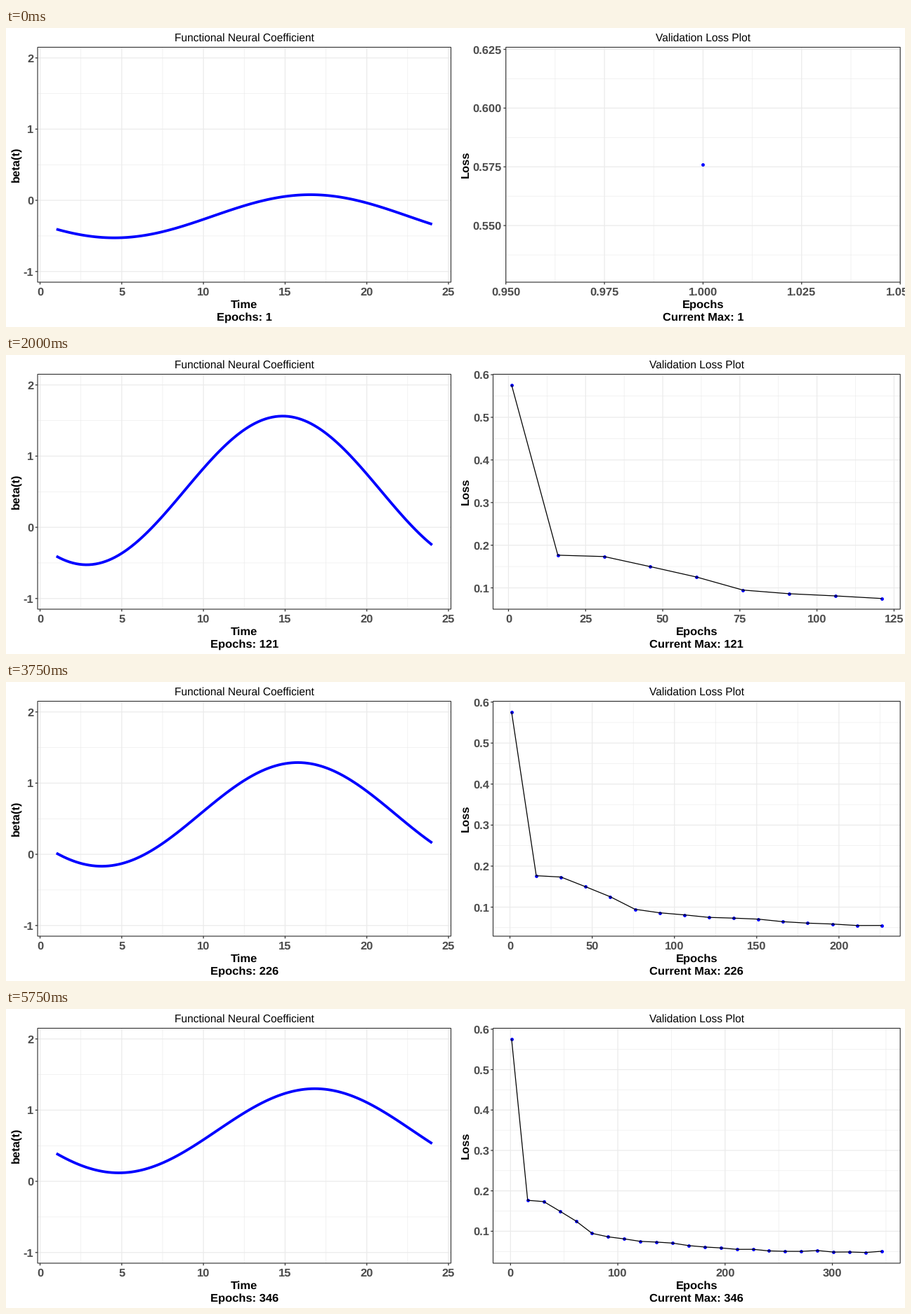
Animation of 1280 by 427 pixels, one loop 6000 ms. Source, as a matplotlib script:

```python
import math

import matplotlib.pyplot as plt
import numpy as np
from matplotlib.animation import FuncAnimation
from matplotlib.patches import Rectangle

W, H, DPI = 1280, 427, 64
PT = 72 / DPI  # points per pixel
FRAMES, INTERVAL = 24, 250
TOP, BOTTOM = 27.5, 363.0

plt.rcParams["font.family"] = "Liberation Sans"
plt.rcParams["text.hinting"] = "none"

epochs = 1 + 15 * np.arange(FRAMES)
loss = np.array([
    .5759, .1766, .1734, .1497, .1253, .0948, .0862, .0811,
    .0750, .0732, .0707, .0645, .0610, .0588, .0552, .0553,
    .0514, .0503, .0502, .0523, .0485, .0487, .0474, .0505])

# Coefficient curve: mean, amplitude and peak time at a few steps
OMEGA = 2 * math.pi / 24
knots = np.array([0, 5, 8, 13, 17, 21, 23])
waves = np.array([
    (-.224, .303, 16.55), (.361, 1.016, 15.11), (.518, 1.044, 14.85),
    (.545, .804, 15.42), (.585, .671, 16.15), (.674, .614, 16.66),
    (.710, .591, 16.82)])


def smooth(x, xs, ys):
    """Cubic Hermite curve through the rows of ys."""
    slopes = np.gradient(ys, xs, axis=0, edge_order=2)
    i = np.clip(np.searchsorted(xs, x, "right") - 1, 0, len(xs) - 2)
    h = (xs[i + 1] - xs[i])[:, None]
    u = (x - xs[i])[:, None] / h
    return ((1 + 2 * u) * (1 - u) ** 2 * ys[i]
            + u * (1 - u) ** 2 * h * slopes[i]
            + u ** 2 * (3 - 2 * u) * ys[i + 1]
            + u ** 2 * (u - 1) * h * slopes[i + 1])


mean, amp, peak = waves.T
basis = np.column_stack(
    [mean, amp * np.cos(OMEGA * peak), amp * np.sin(OMEGA * peak)])
coefs = smooth(np.arange(FRAMES), knots, basis)
time = np.linspace(1, 24, 116)


def extended_breaks(lo, hi, m=5):
    """Extended Wilkinson tick placement; returns (ticks, step)."""
    nice = [1, 5, 2, 2.5, 4, 3]
    span = hi - lo
    unit = 2 * (.1 * span) ** 2
    best, found = -2, None
    for j in range(1, 20):
        for i, q in enumerate(nice):
            simple_max = 2 - i / (len(nice) - 1) - j
            if .25 * simple_max + .75 < best:
                return found
            for k in range(2, 40):
                dense_max = 2 - (k - 1) / (m - 1) if k >= m else 1
                if .25 * simple_max + .25 + .5 * dense_max < best:
                    break
                z = math.ceil(math.log10(span / (k + 1) / (j * q)))
                while True:
                    step = j * q * 10.0 ** z
                    z += 1
                    over = max(0, step * (k - 1) - span) / 2
                    cover_max = 1 - 2 * over ** 2 / unit
                    if (.25 * simple_max + .2 * cover_max
                            + .5 * dense_max + .05 < best):
                        break
                    first = (math.floor(hi / step) - (k - 1)) * j
                    last = math.ceil(lo / step) * j
                    for start in range(first, last + 1):
                        a = start * step / j
                        b = a + step * (k - 1)
                        has_zero = start % j == 0 and a <= 0 <= b
                        simple = 1 - i / (len(nice) - 1) - j + has_zero
                        cover = 1 - ((hi - b) ** 2 + (lo - a) ** 2) / unit
                        r = (k - 1) / (b - a)
                        rt = (m - 1) / (max(b, hi) - min(a, lo))
                        dense = 2 - max(r / rt, rt / r)
                        score = .25 * simple + .2 * cover + .5 * dense + .05
                        if score > best:
                            best = score
                            found = a + step * np.arange(k), step
    return found


def expand(values):
    lo, hi = min(values), max(values)
    pad = .05 * (hi - lo) if hi > lo else .05
    return lo - pad, hi + pad


def within(values, limits):
    lo, hi = limits
    eps = 1e-6 * (hi - lo)
    return [v for v in values if lo - eps <= v <= hi + eps]


def grid(limits, breaks):
    """Major and minor positions that fall inside the limits."""
    ticks, step = breaks
    minor = np.append(ticks[0] - step / 2, ticks + step / 2)
    return within(ticks, limits), within(minor, limits)


def labels(ticks):
    d = next(d for d in range(6)
             if all(abs(t - round(t, d)) < 1e-7 for t in ticks))
    return [f"{round(t, d) + 0:.{d}f}" for t in ticks]


fig = plt.figure(figsize=(W / DPI, H / DPI), dpi=DPI, facecolor="white")
ax = fig.add_axes([0, 0, 1, 1])


def line(xs, ys, color, width, z=2.0):
    ax.plot(xs, ys, color=color, lw=width * PT, zorder=z, snap=False,
            solid_capstyle="butt", solid_joinstyle="round")


def text(x, y, s, ha="center", color="black", size=16.45, weight="bold",
         **kw):
    ax.text(x, y, s, ha=ha, va="baseline", color=color, fontsize=size * PT,
            fontweight=weight, **kw)


def panel(left, right, xlim, ylim, xgrid, ygrid, title, captions, ylabel,
          ylabel_x):
    """Draw the empty plot; return the data-to-pixel mapping."""
    def to_px(x, y):
        px = left + (np.asarray(x) - xlim[0]) / (xlim[1] - xlim[0]) \
            * (right - left)
        py = BOTTOM - (np.asarray(y) - ylim[0]) / (ylim[1] - ylim[0]) \
            * (BOTTOM - TOP)
        return px, py

    for level, width in ((1, .63), (0, 1.25)):
        for x in xgrid[level]:
            px = to_px(x, 0)[0]
            line([px, px], [TOP, BOTTOM], "#ebebeb", width, 1.5 - level / 4)
        for y in ygrid[level]:
            py = to_px(0, y)[1]
            line([left, right], [py, py], "#ebebeb", width, 1.5 - level / 4)

    for x, s in zip(xgrid[0], labels(xgrid[0])):
        px = to_px(x, 0)[0]
        line([px, px], [BOTTOM, BOTTOM + 3.3], "#333333", 1.25)
        text(px, 381.7, s, color="#4d4d4d")
    for y, s in zip(ygrid[0], labels(ygrid[0])):
        py = to_px(0, y)[1]
        line([left - 3.3, left], [py, py], "#333333", 1.25)
        text(left - 5.6, py + 5.9, s, ha="right", color="#4d4d4d")

    ax.add_patch(Rectangle((left, TOP), right - left, BOTTOM - TOP,
                           fill=False, ec="#333333", lw=1.15 * PT,
                           zorder=2.8, snap=False))
    mid = (left + right) / 2
    text(mid, 18.4, title, size=15.55, weight="normal")
    text(mid, 400, captions[0])
    text(mid, 418, captions[1])
    text(ylabel_x, (TOP + BOTTOM) / 2, ylabel, rotation=90,
         rotation_mode="anchor")
    return to_px


def draw_coefficient(n):
    xlim, ylim = (-.15, 25.15), (-1.15, 2.15)
    to_px = panel(45, 633.5, xlim, ylim,
                  grid(xlim, (np.arange(0, 26, 5), 5)),
                  grid(ylim, (np.arange(-1, 3), 1)),
                  "Functional Neural Coefficient",
                  ("Time", f"Epochs: {epochs[n]}"), "beta(t)", 19)
    base, c, s = coefs[n]
    beta = base + c * np.cos(OMEGA * time) + s * np.sin(OMEGA * time)
    line(*to_px(time, beta), "#0000ff", 3.8, 2.5)


def draw_loss(n):
    xs, ys = epochs[:n + 1], loss[:n + 1]
    xlim, ylim = expand(xs), expand(ys)
    xgrid = grid(xlim, extended_breaks(*xlim))
    ygrid = grid(ylim, extended_breaks(*ylim))
    chars = max(map(len, labels(ygrid[0])))
    left = 693.5 + 9.1 * (chars - 3)
    to_px = panel(left, 1273.2, xlim, ylim, xgrid, ygrid,
                  "Validation Loss Plot",
                  ("Epochs", f"Current Max: {epochs[n]}"), "Loss", 659)
    px, py = to_px(xs, ys)
    ax.plot(px, py, "o", color="#0000ff", ms=4.9 * PT, mew=0, zorder=2.4,
            snap=False)
    if n:
        line(px, py, "black", 1.25, 2.5)


def update(n):
    ax.clear()
    ax.set_xlim(0, W)
    ax.set_ylim(H, 0)
    ax.axis("off")
    draw_coefficient(n)
    draw_loss(n)
    return []


anim = FuncAnimation(fig, update, frames=FRAMES, interval=INTERVAL,
                     init_func=lambda: update(0), repeat=True,
                     repeat_delay=0, blit=False)
plt.show()
```
